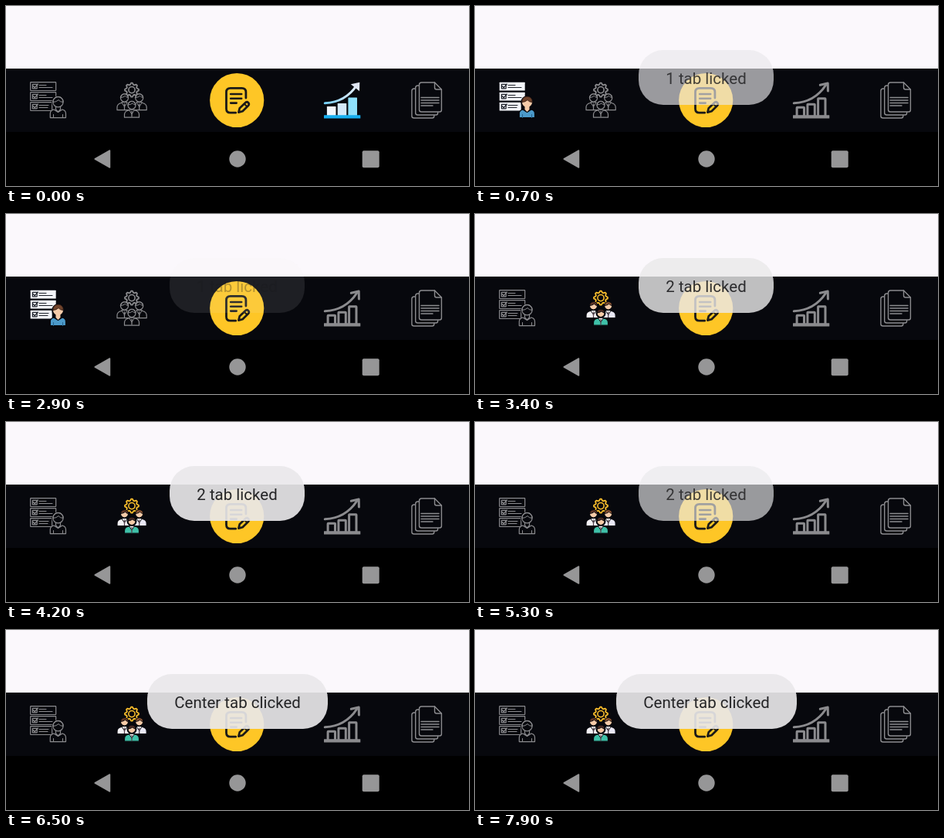
Recreate the animation shown at these times as an HTML page with a canvas. Size 600 px wide and 233 px high, loop 8 s.

```html
<!DOCTYPE html>
<html lang="en">
<head>
<meta charset="utf-8">
<title>Bottom navigation</title>
<style>
html, body { margin: 0; width: 100%; height: 100%; overflow: hidden; background: #000; }
canvas { display: block; width: 600px; height: 233px; }
</style>
</head>
<body>
<canvas id="stage" width="600" height="233"></canvas>
<script>
const ctx = document.getElementById('stage').getContext('2d');
const LOOP = 8000, FADE = 500, SHOW = 1960;
const GREY = '#8b8b8e', INK = '#1b1a18', SKIN = '#f5cba8', BAR = '#07080d';

const toasts = [
  { text: '1 tab licked', start: 470, left: 212, width: 175 },
  { text: '2 tab licked', start: 3070, left: 212, width: 175 },
  { text: 'Center tab clicked', start: 5990, left: 183, width: 234 }
];

const clamp = v => Math.max(0, Math.min(1, v));

function paint(path, fill, stroke, width = 1.2) {
  if (fill) { ctx.fillStyle = fill; ctx.fill(path); }
  if (stroke) {
    ctx.strokeStyle = stroke;
    ctx.lineWidth = width;
    ctx.stroke(path);
  }
}
const shape = (d, fill, stroke, width) => paint(new Path2D(d), fill, stroke, width);

function circle(x, y, r, fill, stroke, width) {
  const p = new Path2D();
  p.arc(x, y, r, 0, Math.PI * 2);
  paint(p, fill, stroke, width);
}

function box(x, y, w, h, r, fill, stroke, width) {
  const p = new Path2D();
  p.roundRect(x, y, w, h, r);
  paint(p, fill, stroke, width);
}

function checklist(on) {
  const line = on ? '#20242c' : GREY;
  for (let i = 0; i < 3; i++) {
    const y = 98.7 + i * 13;
    const w = i === 2 ? 28 : 33;
    box(31.7, y, w, 10.8, 0.5, on ? '#f4f6fa' : null, on ? null : GREY);
    box(34.4, y + 2.6, 5.8, 5.6, 0.3, null, line);
    shape(`M35.5 ${y + 5}l1.8 2 4-4.7`, null, line, 1.3);
    shape(`M43 ${y + 3.8}h${i === 2 ? 12 : 9}M43 ${y + 6.8}h${i === 2 ? 11 : 17}`, null, line, 1.2);
  }
  const body = 'M57.3 144.6V139.5Q57.3 135 62 134L67.5 137.5 73 134Q77.5 135 77.5 139.5V144.6Z';
  circle(67.5, 124.5, 8.3, BAR);
  shape(body, on ? '#4b9aca' : BAR, on ? BAR : GREY);
  shape('M64.5 130V134L67.5 137 70.5 134V130Z', on ? SKIN : BAR, on ? null : GREY);
  circle(67.5, 124.3, 6.6, on ? SKIN : BAR, on ? null : GREY);
  shape('M60.9 124.5Q60.9 117.5 67.5 117.3 74.1 117.5 74.1 124.5 70 124.3 68 121.6 65.5 124.3 60.9 124.5Z',
    on ? '#70432b' : null, on ? '#3a2219' : GREY, 1);
  shape('M61.5 140.5V144.6M73.5 140.5V144.6', null, on ? '#26638f' : GREY, 1);
}

function gear(x, y, color) {
  const p = new Path2D();
  const teeth = 8;
  for (let i = 0; i < teeth * 4; i++) {
    const a = (i - 0.5) / (teeth * 2) * Math.PI - Math.PI / 2;
    const r = i % 4 < 2 ? 9 : 7;
    p.lineTo(x + r * Math.cos(a), y + r * Math.sin(a));
  }
  p.closePath();
  paint(p, BAR, color, 1.8);
  circle(x, y, 4.1, null, color, 1.6);
}

function person(x, y, on, coat, hair) {
  const edge = on ? BAR : GREY;
  shape(`M${x - 9.5} ${y + 15.7}v-3.7q0-4.3 5.5-5.5h8q5.5 1.2 5.5 5.5v3.7z`, on ? coat : BAR, edge);
  shape(`M${x - 3.5} ${y + 6}l3.5 5.5 3.5-5.5z`, on ? '#fff' : BAR, edge, 1);
  shape(`M${x} ${y + 8}v6.5`, null, on ? '#54424c' : GREY, 1.3);
  circle(x, y, 5, on ? SKIN : BAR, edge);
  shape(`M${x - 5} ${y - 0.5}q.2-4.7 5-4.9 4.8.2 5 4.9-3-.3-4-2.2-2 2.1-6 2.2z`, on ? hair : null, edge, 1);
}

function team(on) {
  gear(163, 108.6, on ? '#f8bd2c' : GREY);
  person(153.5, 119, on, '#f4f2f6', '#5f3524');
  person(172.7, 119, on, '#e9e8f5', '#8a5433');
  circle(163, 128.5, 6.5, BAR);
  person(163, 128.5, on, '#3fc0a8', '#4a2b22');
}

function chart(on) {
  const bars = [[416.2, 130, '#f3f6fc'], [430, 126, '#d5e9fa'], [443.7, 118.5, '#8fe0fb']];
  for (const [x, y, fill] of bars) {
    if (on) box(x - 0.3, y, 11.6, 142 - y, 0.6, fill);
    else box(x + 0.9, y + 1.2, 9.4, 142 - y, 0.5, null, GREY, 3);
  }
  box(412, 141.3, 47.3, 4.2, 0.5, on ? '#16aef0' : GREY);
  let ink = GREY;
  if (on) {
    ink = ctx.createLinearGradient(412, 126, 458, 98);
    ink.addColorStop(0, '#6fcdf7');
    ink.addColorStop(0.5, '#bfe2f8');
    ink.addColorStop(1, '#eef0f8');
  }
  shape('M413.3 125.8Q440 124.5 454.5 102.5', null, ink, 3.1);
  if (on) shape('M446.8 101.2L458.3 98.8 458 110.2Z', '#dfe5f1');
  else shape('M447.3 102.3L457.2 100 457.4 110', null, GREY, 3);
}

function docs() {
  const page = 'M538.5 99H555.5L564.4 108V134.5Q564.4 137 562 137H538.5Q535.5 137 535.5 134.5V102Q535.5 99 538.5 99Z';
  for (const i of [2, 1, 0]) {
    ctx.save();
    ctx.translate(-4.8 * i, 4 * i);
    shape(page, BAR, GREY, 1.4);
    ctx.restore();
  }
  shape('M555.5 99V105.5Q555.5 108 558 108H564.4', null, GREY, 1.4);
  shape('M538 118.5H561M538 122H561M538 125.5H561M538 129H553', null, GREY, 1.4);
}

function centerButton(scale) {
  ctx.save();
  ctx.translate(299.2, 122);
  ctx.scale(scale, scale);
  circle(0, 0, 35.1, '#fec626');
  shape('M-1.5 16.2H-8.5Q-13.7 16.2-13.7 11V-10.6Q-13.7-15.7-8.5-15.7H6.5Q11.7-15.7 11.7-10.6V-3', null, INK, 2.8);
  shape('M-8-8H6M-8-2.2H6M-8 3.6H-.5', null, INK, 2.6);
  shape('M2.2 15.6L3.6 10.2 11.5 2.7Q13.3 1.6 14.8 3.2 16.4 5 15 6.7L7.4 14.2Z', null, INK, 2.7);
  shape('M9.6 4.6L13.2 8.2', null, INK, 2);
  ctx.restore();
}

function toastLevel(age) {
  if (age <= 0 || age >= SHOW + FADE) return 0;
  if (age < SHOW) return 1 - (1 - clamp(age / FADE)) ** 2;
  return 1 - ((age - SHOW) / FADE) ** 2;
}

function drawToast({ text, start, left, width }, t) {
  const k = toastLevel(t - start);
  if (!k) return;
  box(left, 57, width, 71, 32, `rgba(234,233,235,${0.915 * k})`);
  // Text gains strength sooner than its panel.
  ctx.fillStyle = `rgba(26,26,28,${0.95 * Math.sqrt(k)})`;
  ctx.fillText(text, left + width / 2, 100.5);
}

// Quick growth on press, slower linear return.
const pressScale = t => 1 + 0.2 * Math.min(clamp((t - 5750) / 150), clamp((6300 - t) / 400));

function draw(t) {
  const tab = t < 400 ? 4 : t < 3000 ? 1 : 2;
  ctx.fillStyle = '#fbf8fc';
  ctx.fillRect(0, 0, 600, 81);
  ctx.fillStyle = BAR;
  ctx.fillRect(0, 81, 600, 82);
  ctx.fillStyle = '#000';
  ctx.fillRect(0, 163, 600, 70);

  shape('M115.2 198L134.5 187V209Z', '#969697', '#969697', 1.5);
  circle(300, 198, 10.7, '#969697');
  box(461.7, 187.2, 22, 22, 2, '#969697');

  checklist(tab === 1);
  team(tab === 2);
  chart(tab === 4);
  docs();
  centerButton(pressScale(t));
  for (const toast of toasts) drawToast(toast, t);
}

ctx.font = '20.5px Roboto, sans-serif';
ctx.textAlign = 'center';
ctx.lineJoin = 'round';
ctx.lineCap = 'round';

const begin = performance.now();
function tick() {
  draw((performance.now() - begin) % LOOP);
  requestAnimationFrame(tick);
}
tick();
</script>
</body>
</html>
```
